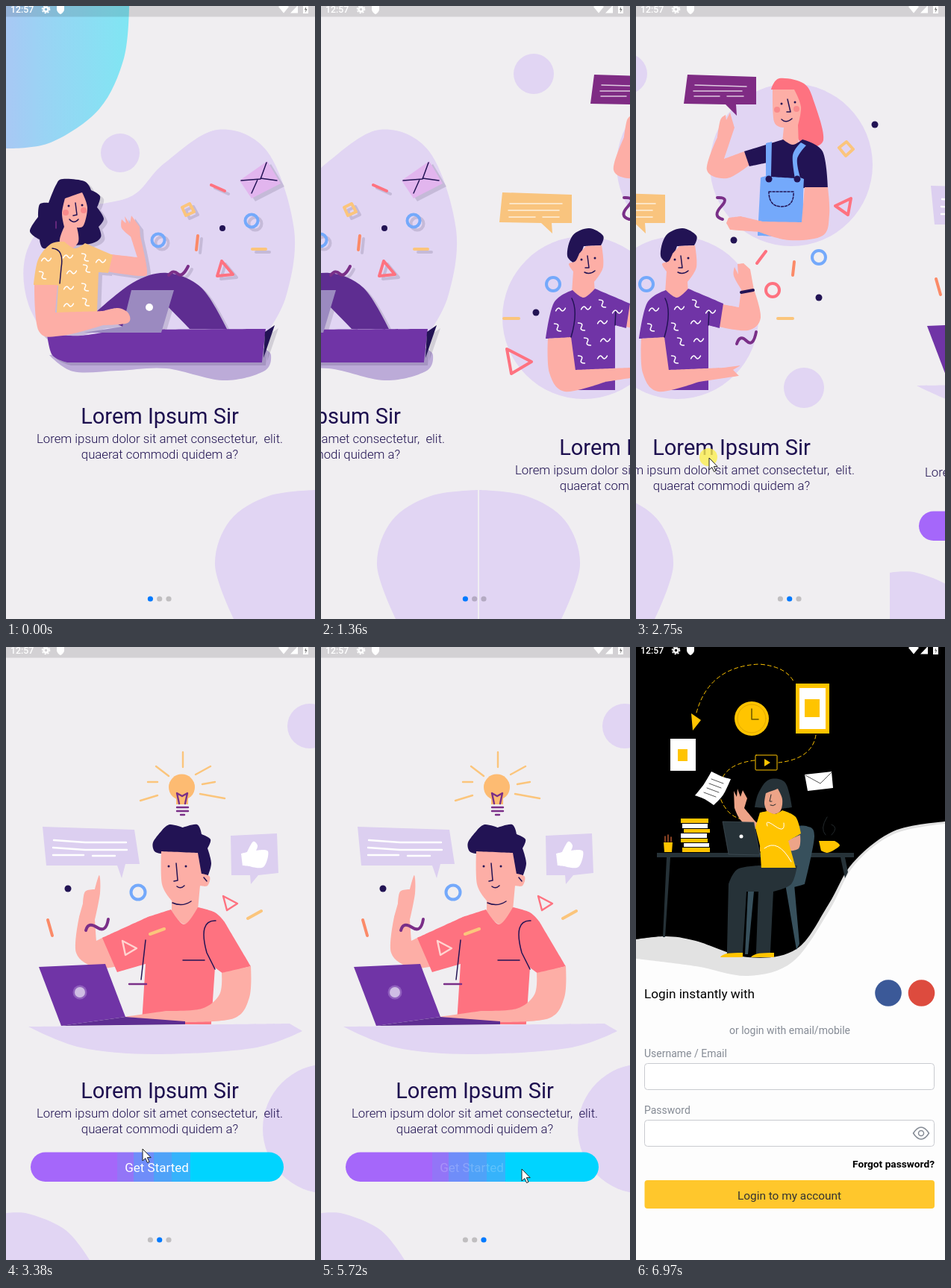
These frames come from a looping animation (414 px wide and 822 px high, 7920 ms). An HTML page:

```html
<!DOCTYPE html>
<html lang="en">
<head>
<meta charset="utf-8">
<title>Onboarding</title>
<style>
html, body { margin: 0; width: 100%; height: 100%; overflow: hidden; background: #f0eef1; }
svg { display: block; width: 414px; height: 822px; font-family: Roboto, "Open Sans", sans-serif; }
text { white-space: pre; }
.lilac { fill: #e1d5f3; }
.navy { fill: #221354; }
.skin { fill: #fdaea6; }
.violet { fill: #7034a6; }
.plum { fill: #5e2d91; }
.pink { fill: #fe7280; }
.amber { fill: #f9c47e; }
.blush { fill: #f98a8c; }
.white { fill: #fff; }
.line { fill: none; stroke-linecap: round; stroke-linejoin: round; stroke-width: 4; }
.mid { stroke-width: 2.4; }
.thin { stroke-width: 1.5; }
.hair { stroke-width: 1; }
.sNavy { stroke: #221354; }
.sPink { stroke: #fe7280; }
.sAmber { stroke: #fbc57c; }
.sOrange { stroke: #fb8a68; }
.sBlue { stroke: #74a9fb; }
.sPlum { stroke: #7a2f88; }
.sWhite { stroke: #fff; }
.copy { fill: #1d0f4f; text-anchor: middle; }
.copy .title { font-size: 29px; }
.copy .para { font-size: 16.8px; font-weight: 300; }
.gold { fill: #ffc400; }
.slate { fill: #263238; }
.steel { fill: #37505c; }
.tan { fill: #eda488; }
.sGold { stroke: #ffc400; }
.field { fill: #fff; stroke: #c9cbd0; }
.label { fill: #858b95; font-size: 14px; }
</style>
</head>
<body>
<svg viewBox="0 0 414 822">
<defs>
  <linearGradient id="sky"><stop stop-color="#a8c8f4"/><stop offset=".3" stop-color="#9ad3f4"/><stop offset="1" stop-color="#80e6f3"/></linearGradient>
  <linearGradient id="cta" gradientUnits="userSpaceOnUse" x1="33" x2="372"></linearGradient>
  <path id="wave" class="line thin" d="M-6 3q2 -7 6 -3t6 -3"/>
  <path id="corner" class="lilac" data-s="415,649! 352,657 300,690 280,750 305,822! 415,822!"/>
  <g id="copy" class="copy">
    <text class="title" x="206">Lorem Ipsum Sir</text>
    <text class="para" x="206" y="25.5">Lorem ipsum dolor sit amet consectetur,  elit.</text>
    <text class="para" x="206" y="47">quaerat commodi quidem a?</text>
  </g>
</defs>
<rect width="414" height="822" fill="#f0eef1"/>

<g id="pages">
  <!-- laptop on lap -->
  <g>
    <path fill="url(#sky)" data-s="0,191! 60,183 125,138 158,70 165,0! 0,0!"/>
    <use href="#corner"/>
    <circle class="lilac" cx="153" cy="197" r="26"/>
    <path class="lilac" data-s="110,269 170,254 212,211 283,166 350,195 386,300 375,390 345,445! 70,470! 30,400 26,335 58,286"/>
    <path fill="#bcabd8" data-s="58,468! 90,490 150,489 215,486 290,502 345,490 355,468 343,458!"/>
    <g style="filter:drop-shadow(5px 4px 0 rgba(30,20,60,.14))">
      <path class="navy" data-s="67,240 76,232 105,235 114,247! 126,255 122,270! 131,285 124,296! 127,310 112,319 70,322 50,325 45,313! 32,302 43,283! 45,266 57,264!"/>
      <path class="plum" data-s="120,411! 170,371 216,358 262,378 296,433! 246,433! 214,400! 160,432!"/>
      <path class="violet" data-s="55,440! 100,442 150,434! 348,433! 343,478! 82,478! 62,468"/>
      <path class="navy" d="M347 437L360 428L345 472Z"/>
      <path class="skin" data-s="135,356! 141,333! 176,337! 167,309! 155,298 155,286! 161,292! 159,282! 166,292! 168,281! 179,296! 180,309! 189,355 180,362"/>
      <path class="skin" data-s="79,258! 102,250! 109,270 104,294 95,297! 97,316 84,327 72,316 78,296! 75,278"/>
      <path class="amber" data-s="60,319 78,316! 92,325 106,318! 143,334! 137,358! 124,357! 122,412! 68,412! 70,375! 37,374! 43,340"/>
      <path fill="#9b8ac0" d="M168 381H225L208 438H104L156 430Z"/>
      <path class="skin" data-s="38,374! 69,374! 66,411! 130,409! 150,405 164,412 163,425 130,428! 76,442 44,436"/>
      <path class="line sPlum" d="M218 361Q224 353 230 359T244 349"/>
      <path class="line sPink" d="M275 240L293 248M289 342L304 360L283 362Z"/>
      <path class="line sAmber" d="M236 270L246 265L252 276L241 281ZM330 326H348"/>
      <g class="line sBlue" data-dots="8.5 204,314 329,288"></g>
      <path class="line sOrange" d="M257 308L255 327"/>
      <path fill="#e2b5ee" d="M313 234L350 208L368 238L329 258Z"/>
    </g>
    <path class="line thin sNavy" d="M315 234L341 232L349 210M341 231L363 234M337 233L329 251M62 325Q78 326 74 351L72 372M93 264L95 280L90 281M85 286Q91 293 97 286"/>
    <g class="navy" data-dots="4 290,298"></g>
    <g class="navy" data-dots="1.5 84,268 102,267"></g>
    <g class="blush" data-dots="4 80,277 104,274"></g>
    <path class="line thin sPlum" d="M67 289V298"/>
    <g class="white" data-dots="5 192,404"></g>
    <g class="sWhite" data-waves="54,340 49,361 83,336 106,337 88,357 108,352 84,378 106,377 84,401 107,397 127,342"></g>
    <use href="#copy" y="560"/>
  </g>

  <!-- two friends -->
  <g transform="translate(424)">
    <use href="#corner" transform="matrix(-1 0 0 1 408 0)"/>
    <g transform="translate(78)">
      <g class="lilac" data-dots="27 -12,91 225,512"></g>
      <g class="lilac" data-dots="109 208,213 55,418"></g>
      <path fill="#7f2b84" d="M69 92L161 95V132H134L135 147L120 132L64 131Z"/>
      <path class="amber" d="M-54 250L39 253V291H12L13 305L-2 291L-58 290Z"/>
      <path class="line sWhite thin" opacity=".75" d="M79 106L148 108M77 114H142M78 121H112M122 121H144M-44 265H26M-46 274H22M-45 283H-10M0 283H22"/>
      <path class="pink" data-s="181,112! 192,97 225,104 239,130 251,180 226,192! 211,168! 205,115!"/>
      <path class="skin" data-s="183,112! 212,112! 221,135 217,160! 218,184! 207,190 196,184! 198,163! 185,155"/>
      <path class="skin" data-s="145,195! 152,213! 122,231 95,220 109,176! 113,153 120,146! 121,153! 126,143! 132,163! 118,205!"/>
      <path class="navy" data-s="145,195! 197,179! 210,186 223,179! 250,195 257,244! 226,244! 172,250! 176,210! 152,215!"/>
      <path fill="#74a9fb" data-s="174,184! 182,182! 181,229! 213,231! 210,200 221,183! 228,187! 216,205 220,230! 225,232! 224,270 228,311! 163,308! 167,230! 174,228!"/>
      <path class="line thin sNavy" stroke-dasharray="3 2" d="M178 249H211Q212 269 195 269T178 249Z"/>
      <path class="skin" data-s="226,243! 257,243! 259,280 250,308 205,314 165,303! 126,300! 121,291! 124,284! 140,282! 170,289! 222,290!"/>
      <path class="navy" data-s="46,347! 33,335 40,308 62,298 81,308 78,321! 55,322!"/>
      <path class="skin" data-s="49,332! 58,322! 79,321! 81,350 69,370! 70,384! 55,392 39,386! 41,356! 35,346 44,342"/>
      <path class="skin" data-s="111,430! 116,400! 138,404! 141,380! 131,362 132,350! 137,360! 136,346! 144,345! 153,353! 158,380! 167,418 150,435"/>
      <path class="violet" data-s="40,381! 55,391 70,379! 117,399! 112,432! 97,428! 97,515! 37,515! 36,445! 4,446! 15,398"/>
      <path class="skin" data-s="7,446! 38,444! 44,488! 118,485! 140,482! 130,488! 138,496! 84,504! 30,517 9,492"/>
      <path class="line sNavy" d="M141 384L157 381"/>
      <path class="line thin sNavy" d="M39 392Q48 410 38 444M97 428L98 408M203 125L207 142H202M195 152Q201 158 209 151M60 335L62 351H57M56 357Q63 361 70 355"/>
      <g class="navy" data-dots="4.5 131,314 320,159 245,391 -9,411 178,232 216,232"></g>
      <g class="navy" data-dots="1.5 195,131 213,129 52,340 70,338"></g>
      <g class="blush" data-dots="4 189,139 215,138"></g>
      <path class="line sPlum" d="M109 257Q126 256 114 269T116 286M135 453Q139 440 148 449T161 437"/>
      <path class="line sPink" d="M174 329L162 345M267 268L288 258L284 280ZM-48 460L-15 477L-42 493Z"/>
      <g class="line sPink" data-dots="9 183,381"></g>
      <g class="line sBlue" data-dots="9 245,337 14,373"></g>
      <path class="line sOrange" d="M212 343L210 361"/>
      <path class="line sAmber" d="M190 419H210M-52 419H-32M272 190L282 182L291 192L281 201Z"/>
      <g class="sWhite" data-waves="24,407 20,431 58,405 80,399 100,410 52,430 80,424 60,450 84,448 52,474 80,471"></g>
    </g>
    <use href="#copy" y="602"/>
  </g>

  <!-- idea at the desk -->
  <g transform="translate(848)">
    <g class="lilac">
      <circle cx="407" cy="106" r="30"/><circle cx="431" cy="646" r="87"/>
      <path data-s="-6,760! 30,760 80,782 112,822! -6,822!"/>
      <path data-s="30,509! 380,505! 397,515! 330,538 200,546 100,537"/>
    </g>
    <path fill="#dccff0" d="M49 241L172 245L179 291H160L155 310L149 293H54ZM301 253L363 250L365 303L338 306L328 318L327 306H302Z"/>
    <path class="line sWhite mid" d="M64 259L106 262H161M63 269L106 272H162M63 279H104M116 280H146"/>
    <path class="white" data-s="315,277! 323,275! 331,261 337,266 335,273! 351,274 345,295 326,294! 317,293!"/>
    <path class="line sAmber mid" d="M237 141V161M254 171L274 160M263 184L280 181M201 160L218 173M190 181H203M180 206L203 199M260 197L293 203"/>
    <g fill="#fdbb72"><circle cx="235.500" cy="188" r="17.500"/><rect x="228" y="198" width="16" height="13"/></g>
    <path class="line sPlum mid" d="M232 210L229 196L236 200L243 196L240 210M229 215H244M229 220H244M234 225H239"/>
    <path class="navy" data-s="197,262 208,247! 219,238 237,242! 256,238 262,251! 274,258 270,270! 275,290 270,308! 260,308! 256,278! 208,277! 199,274"/>
    <path class="skin" data-s="208,274! 257,276! 262,304! 273,308 270,320 260,320! 257,354! 240,372 222,356! 222,340! 209,318"/>
    <path class="skin" data-s="131,389! 149,428! 120,430 94,410 98,362! 103,344! 106,328 119,325! 125,306 126,330 119,366! 121,394!"/>
    <path class="pink" data-s="221,352! 239,372 257,349! 280,356 293,369! 328,428! 291,438! 280,430! 275,506! 182,506! 187,425! 149,436! 129,390! 190,362!"/>
    <path class="skin" data-s="289,437! 328,428! 326,470 305,498 240,503! 158,496! 215,488! 262,485 286,466"/>
    <path class="violet" d="M44 429L133 425L160 496L74 508Z"/>
    <path class="plum" d="M160 496L240 502V506L74 508Z"/>
    <g fill="#8f5fbd" data-dots="9.5 99,463"></g>
    <g fill="#cfbde4" data-dots="7 99,463"></g>
    <path class="line thin sNavy" d="M187 393L181 446M281 367Q257 366 269 410L280 432M237 420H266M223 343Q236 349 248 341M228 290L230 313L225 314M229 321Q234 325 239 320M265 309L269 314"/>
    <path class="line sPlum" d="M107 380Q110 368 122 376T137 365"/>
    <path class="line sPlum mid" d="M165 452H188"/>
    <g class="navy" data-dots="4.5 83,324"></g>
    <g class="navy" data-dots="1.5 218,294 241,294"></g>
    <g class="line sBlue" data-dots="9.5 177,329"></g>
    <path class="line sOrange" d="M56 366L62 387"/>
    <path class="line sPink mid" d="M291 334L310 344L296 353Z"/>
    <path class="line mid" stroke="#ffd4d0" d="M156 394L175 404L160 413Z"/>
    <path class="line sAmber" d="M193 385L212 378M324 364L342 354"/>
    <use href="#copy" y="605"/>
    <rect x="33" y="677.500" width="339" height="39.500" rx="19.700" fill="url(#cta)"/>
    <text id="ctaText" x="202" y="704" text-anchor="middle" font-size="17" fill="#fff">Get Started</text>
  </g>
</g>

<g id="dots" data-dots="3.6 193.4,795 205.7,795 218,795"></g>

<g id="login">
  <rect y="-40" width="414" height="900" fill="#fdfdfd"/>
  <g id="art">
    <path fill="#e2e2e2" data-s="0,0! 414,0! 414,237! 345,251 292,293 258,355 210,422 150,441 80,428 0,418!"/>
    <path id="night" data-s="0,0! 414,0! 414,234! 345,247 290,290 258,345 215,405 150,416 80,394 40,388 0,392!"/>
    <path class="line sGold hair" stroke-dasharray="5 4" d="M81 88Q98 26 165 23Q202 26 212 48M241 118Q236 150 191 155M159 152Q108 158 112 200Q122 230 148 232"/>
    <g class="gold" data-dots="23 155,96"></g>
    <g class="line hair" stroke="#e0a800" data-dots="19 155,96"></g>
    <path class="line thin" stroke="#6b5600" d="M155 83V97H164"/>
    <path class="gold" d="M74 89L87 98L76 112ZM214 49h45v67h-45Z"/>
    <path class="white" d="M219 55h35v55h-35ZM46 123h34v43h-34ZM226 171L262 167L264 189L230 193Z"/>
    <path class="white" data-s="101,167! 116,174 127,177! 117,198 104,212! 92,204 79,199! 91,184"/>
    <path class="gold" d="M226 70h20v24h-20ZM56 137h13v16h-13ZM172 150l8 5l-8 5Z"/>
    <rect class="line sGold hair" x="160" y="145" width="29" height="20" rx="1"/>
    <path class="line hair" stroke="#555" d="M227 172L247 183L262 168M101 177l16 6M98 183l16 6M95 189l16 6M91 195l16 6"/>
    <path class="slate" d="M28 276H292V282H28ZM41 282H46L39 389H36ZM274 282H280L284 302L280 310Z"/>
    <path class="steel" data-s="207,242! 228,240 239,254 226,318! 205,324!"/>
    <path class="steel" d="M200 318H212L219 398L215 406ZM150 328H158L150 412H146Z"/>
    <path class="slate" data-s="166,293! 216,293! 208,318 184,328! 180,412! 161,412! 164,328! 148,328! 143,412! 122,412! 124,318! 136,298"/>
    <path class="gold" d="M113 416Q116 409 143 410V416ZM154 416Q158 409 185 410V416ZM37 262H49L48 275H38ZM60 230H97V236H60ZM64 244H99V249H64ZM60 257H96V262H60ZM62 269H99V275H62Z"/>
    <path class="gold" data-s="245,260! 266,260! 273,266 264,273! 256,276 248,273!"/>
    <path class="white" d="M62 237h34v6h-34ZM60 250h35v6h-35ZM64 263h34v5h-34Z"/>
    <path class="line thin" stroke="#b4572e" d="M39 261V254M43 261V252M47 261V255"/>
    <path class="tan" data-s="132,216! 131,193! 135,201! 136,190! 140,201! 143,192! 149,203! 145,216! 160,234! 168,240! 156,244 140,232"/>
    <path class="tan" data-s="166,268! 192,268! 206,258! 220,252! 218,270 200,274! 166,274!"/>
    <path class="slate" data-s="164,196 178,178 200,182 209,215! 194,217! 173,216! 159,215!"/>
    <path class="tan" data-s="174,196! 190,190! 196,204 194,219 186,224 176,222! 172,210"/>
    <path class="gold" data-s="166,222! 176,220! 186,224 196,219! 214,228 221,250! 204,260! 214,296! 168,296! 166,266! 160,242!"/>
    <path class="line sWhite hair" d="M176 240Q172 230 186 240T198 236M172 270Q190 256 208 288"/>
    <path class="slate" stroke="#4a5a62" stroke-width=".6" d="M116 234L158 235L166 279L124 278Z"/>
    <g class="white" data-dots="2.5 141,254"></g>
    <path class="line hair" stroke="#23292c" d="M254 252Q246 244 256 228M262 252Q272 242 262 238M181 198L179 207H182M180 212Q184 214 187 211"/>
  </g>
  <g id="badges"><circle cx="338" cy="464" r="17.800" fill="#3b5998"/><circle cx="382.500" cy="464" r="17.800" fill="#dd4b3e"/></g>
  <text x="11" y="470.500" font-size="17.200">Login instantly with</text>
  <text class="label" x="206" y="518.500" text-anchor="middle">or login with email/mobile</text>
  <text class="label" x="11" y="550">Username / Email</text>
  <rect class="field" x="11.500" y="558.500" width="388" height="35" rx="4"/>
  <text class="label" x="11" y="626">Password</text>
  <rect class="field" x="11.500" y="634.500" width="388" height="35" rx="4"/>
  <g class="line thin" stroke="#858b95"><path d="M371.500 652Q382 636 392.500 652Q382 668 371.500 652Z"/><circle cx="382" cy="652" r="3.500"/></g>
  <text x="400" y="698" text-anchor="end" font-size="13.700" font-weight="700">Forgot password?</text>
  <rect x="11.500" y="715" width="388.500" height="38" rx="4" fill="#ffc72c"/>
  <text x="205.500" y="740.500" text-anchor="middle" font-size="15.400" fill="#333">Login to my account</text>
</g>

<rect id="bar" width="414" height="14.500"/>
<g class="white">
  <text x="6" y="9" font-size="12.300" font-weight="500">12:57</text>
  <circle class="line sWhite mid" cx="53.500" cy="4.500" r="3"/>
  <circle class="line sWhite thin" stroke-dasharray="1 3" cx="53.500" cy="4.500" r="5"/>
  <path d="M68 0L73 -2L78 0V5Q77 9 73 11Q69 9 68 5Z"/>
  <path d="M365 1Q372 -4 379 1L372 9.500ZM381 9.500L391 -1V9.500ZM398 0H405V10H398Z"/>
  <path fill="#777" d="M402 1L400 5H401.500L401 9L403.500 4H402Z"/>
</g>

<g id="cursor">
  <circle id="press" cx="-1" cy="-1" r="12" fill="#fbee50" opacity=".8"/>
  <path fill="#fff" stroke="#222" d="M0 0V16L3.800 12.600L6.500 18.500L9 17.400L6.300 11.600H11.200Z"/>
</g>
</svg>
<script>
const LOOP = 7920, STRIDE = 424;
const $ = id => document.getElementById(id);
const each = (attr, fn) => document.querySelectorAll(`[data-${attr}]`).forEach(el => fn(el, el.dataset[attr].split(' ')));
const pair = s => s.split(',').map(parseFloat);

// Closed smooth outline through points; "!" marks a corner
function outline(words) {
  const n = words.length, pts = words.map(pair);
  const knob = (i, sign) => pts[i].map((v, k) =>
    words[i].endsWith('!') ? v : v + sign * (pts[(i + 1) % n][k] - pts[(i + n - 1) % n][k]) / 6);
  return `M${pts[0]}` + pts.map((_, i) => {
    const j = (i + 1) % n;
    return `C${knob(i, 1)} ${knob(j, -1)} ${pts[j]}`;
  }).join('') + 'Z';
}
each('s', (el, words) => el.setAttribute('d', outline(words)));
each('dots', (el, [r, ...spots]) => {
  el.innerHTML = spots.map(pair).map(([x, y]) => `<circle cx="${x}" cy="${y}" r="${r}"/>`).join('');
});
each('waves', (el, spots) => {
  el.innerHTML = spots.map((p, i) =>
    `<use href="#wave" transform="translate(${p}) rotate(${i % 2 ? 75 : 10})"/>`).join('');
});

// Hard-edged bands across the button
const bands = [['#a567fa', 33], ['#9375f7', 149], ['#6f8df9', 171], ['#4fa2f8', 198], ['#36b3fb', 222], ['#00d4ff', 247]];
$('cta').innerHTML = bands.map(([c, x], i) => [x, bands[i + 1]?.[1] ?? 372].map(e =>
  `<stop offset="${(e - 33) / 339}" stop-color="${c}"/>`).join('')).join('');

// Each row holds until the next one starts
const row = (track, t) => track.findLast(r => r[0] <= t);

const FRAME = 156;
const swipePath = [5, 30, 78, 205, 340, 405, STRIDE];
const swiped = since => since < 0 ? 0 : swipePath[Math.min(6, Math.floor((since + 5) / FRAME))];

// start, end, from x, y, to x, y, pressed
const moves = [
  [110, 430, 298, 752, 306, 724], [890, 1200, 300, 722, 95, 724, 1],
  [1820, 2130, 317, 600, 306, 575], [2440, 2750, 290, 578, 98, 606, 1],
  [2910, 3380, 82, 622, 183, 673], [3520, 3990, 196, 680, 232, 695],
  [4310, 4780, 240, 697, 269, 700], [6520, 6670, 270, 702, 273, 705],
  [6820, 6970, 300, 745, 300, 745]
];
// start, screen opacity, shift, picture opacity, sky grey
const login = [[0, 0, -21, 0, 136], [6520, .5, -21, .1, 136], [6670, 1, -21, .5, 136], [6820, 1, 0, .8, 60], [6970, 1, 0, 1, 0]];

function drawCursor(t) {
  const shown = (t >= 110 && t < 1360) || (t >= 1820 && t < 6970);
  $('cursor').style.display = shown ? '' : 'none';
  if (!shown) return;
  const [t0, t1, x0, y0, x1, y1, down] = row(moves, t);
  const n = Math.round((t1 - t0) / FRAME);
  const u = Math.min(1, Math.floor((t - t0) / (t1 - t0) * n + .05) / n);
  $('cursor').setAttribute('transform', `translate(${x0 + (x1 - x0) * u} ${y0 + (y1 - y0) * u})`);
  $('press').style.display = down ? '' : 'none';
}

function draw(t) {
  $('pages').setAttribute('transform', `translate(${-swiped(t - 890) - swiped(t - 2440)})`);
  const active = (t >= 1960) + (t >= 3520);
  [...$('dots').children].forEach((d, i) => d.setAttribute('fill', i === active ? '#007aff' : 'rgba(0,0,0,.2)'));
  $('ctaText').style.opacity = t >= 5720 && t < 6040 ? .2 : 1;
  drawCursor(t);

  const [, alpha, shift, art, grey] = row(login, t);
  $('login').style.display = alpha ? '' : 'none';
  $('login').style.opacity = alpha;
  $('login').setAttribute('transform', `translate(0 ${shift})`);
  $('art').style.opacity = art;
  $('badges').style.opacity = Math.min(1, art * 1.1);
  $('night').setAttribute('fill', `rgb(${grey},${grey},${grey})`);
  $('bar').setAttribute('fill', alpha === 1 ? '#000' : 'rgba(0,0,0,.12)');
}

const start = performance.now();
function tick() {
  draw((performance.now() - start) % LOOP);
  requestAnimationFrame(tick);
}
tick();
</script>
</body>
</html>
```
